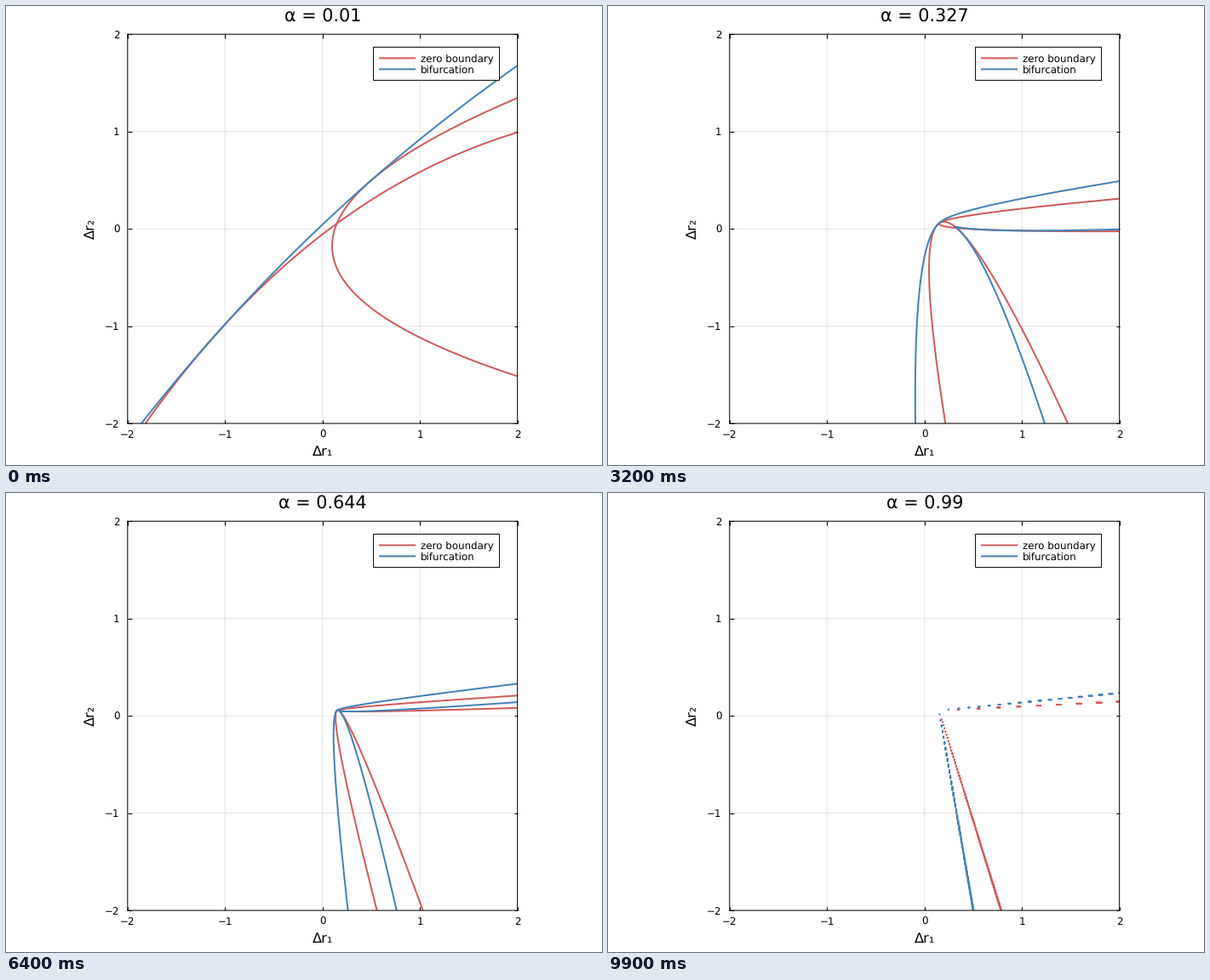
Write a matplotlib script that moves like this. It is 700x540 px and loops after 10 s.

```python
import numpy as np
import matplotlib.pyplot as plt
from matplotlib.animation import FuncAnimation
from matplotlib.patches import Rectangle

W, H, DPI = 700, 540, 100
FRAMES, INTERVAL = 100, 100
LEFT, RIGHT, TOP, BOTTOM = 142.8, 600.7, 33.2, 491.1
PX = 72 / DPI
RED, BLUE = "indianred", "steelblue"

# Quadratic map (u, v) -> (dr1, dr2):
# ORIGIN + (1 - a) * (LU u + LV v) + a * (QUU u^2 + QUV u v + QVV v^2)
ORIGIN = np.array([0.148, 0.0555])
LU, LV = np.array([0.30178, 0.22065]), np.array([0.0449, 0.1069])
QUU = np.array([0.31039, -1.0])
QUV = np.array([-0.81069, 0.36596])
QVV = np.array([1.0, 0.0486])

axis = np.linspace(-2, 2, 400)
GX, GY = np.meshgrid(axis, axis)


def cross(a, b):
    return a[0] * b[1] - a[1] * b[0]


def parabola(x, y, lin, quad):
    """Implicit form of the curve lin * t + quad * t^2."""
    t = cross((x, y), quad) / cross(lin, quad)
    return x * quad[0] + y * quad[1] - t * (lin @ quad) - t**2 * (quad @ quad)


def fold(x, y):
    """Discriminant of the conic pencil: zero where two preimages merge."""
    mul = np.convolve
    a, b, h = QUU, QVV, QUV / 2
    g, f = LU / 2, LV / 2
    d = mul(a, b) - mul(h, h)
    r = 2 * mul(mul(f, g), h) - mul(a, mul(f, f)) - mul(b, mul(g, g))
    p0 = r[0] - x * d[0]
    p1 = r[1] - x * d[1] - y * d[0]
    p2 = r[2] - x * d[2] - y * d[1]
    p3 = r[3] - y * d[2]
    return (18 * p3 * p2 * p1 * p0 - 4 * p2**3 * p0 + p2**2 * p1**2
            - 4 * p3 * p1**3 - 27 * p3**2 * p0**2)


# Keep fractional pixel positions instead of rounding lines and glyphs
plt.rcParams.update({"font.family": "DejaVu Sans", "path.snap": False,
                     "text.hinting": "none"})
fig = plt.figure(figsize=(W / DPI, H / DPI), dpi=DPI, facecolor="white")

ax = fig.add_axes([LEFT / W, 1 - BOTTOM / H,
                   (RIGHT - LEFT) / W, (BOTTOM - TOP) / H])
ax.set(xlim=(-2, 2), ylim=(-2, 2), xticks=range(-2, 3), yticks=range(-2, 3))
ax.set_axisbelow(True)
ax.grid(color="black", alpha=0.1, linewidth=PX)
ax.tick_params(direction="in", length=4.5 * PX, width=PX, top=True, right=True,
               labelbottom=False, labelleft=False)
for spine in ax.spines.values():
    spine.set_linewidth(PX)

# Overlay in pixel coordinates, y down
stage = fig.add_axes([0, 0, 1, 1], zorder=5)
stage.set(xlim=(0, W), ylim=(H, 0))
stage.axis("off")


def label(x, y, text, size, ha="center", **kw):
    return stage.text(x, y, text, fontsize=size * PX, ha=ha, va="baseline", **kw)


title = label(371.8, 18.2, "", 20.8)
label(371.8, 528.8, "Δr₁", 16.3)
label(103.5, 262, "Δr₂", 16.3, rotation=90, rotation_mode="anchor")
for n in range(-2, 3):
    name = str(n).replace("-", "−")
    step = (n + 2) / 4
    label(LEFT + step * (RIGHT - LEFT), 507.5, name, 11.9)
    label(133.5, BOTTOM - step * (BOTTOM - TOP) + 4.4, name, 11.9, "right")

stage.add_patch(Rectangle((431.6, 48.4), 148, 39, facecolor="white",
                          edgecolor="black", linewidth=PX))
for y, color, name in ((61.4, RED, "zero boundary"), (74.4, BLUE, "bifurcation")):
    stage.plot([438, 481.2], [y, y], color=color, linewidth=2 * PX,
               solid_capstyle="butt")
    label(487, y + 4.4, name, 11.9, "left")

curves = []


def draw(i):
    a = 0.01 + 0.98 * i / (FRAMES - 1)
    title.set_text(f"α = {round(a, 3)}")
    k = a / (1 - a) ** 2
    x, y = k * (GX - ORIGIN[0]), k * (GY - ORIGIN[1])
    while curves:
        curves.pop().remove()
    for field, color in ((parabola(x, y, LU, QUU), RED),
                         (parabola(x, y, LV, QVV), RED),
                         (fold(x, y), BLUE)):
        field = field / np.abs(field).max()
        curves.append(ax.contour(GX, GY, field, levels=[0], colors=color,
                                 linewidths=2 * PX))
    return []


anim = FuncAnimation(fig, draw, frames=FRAMES, interval=INTERVAL,
                     repeat=True, repeat_delay=0, blit=False)
plt.show()
```
